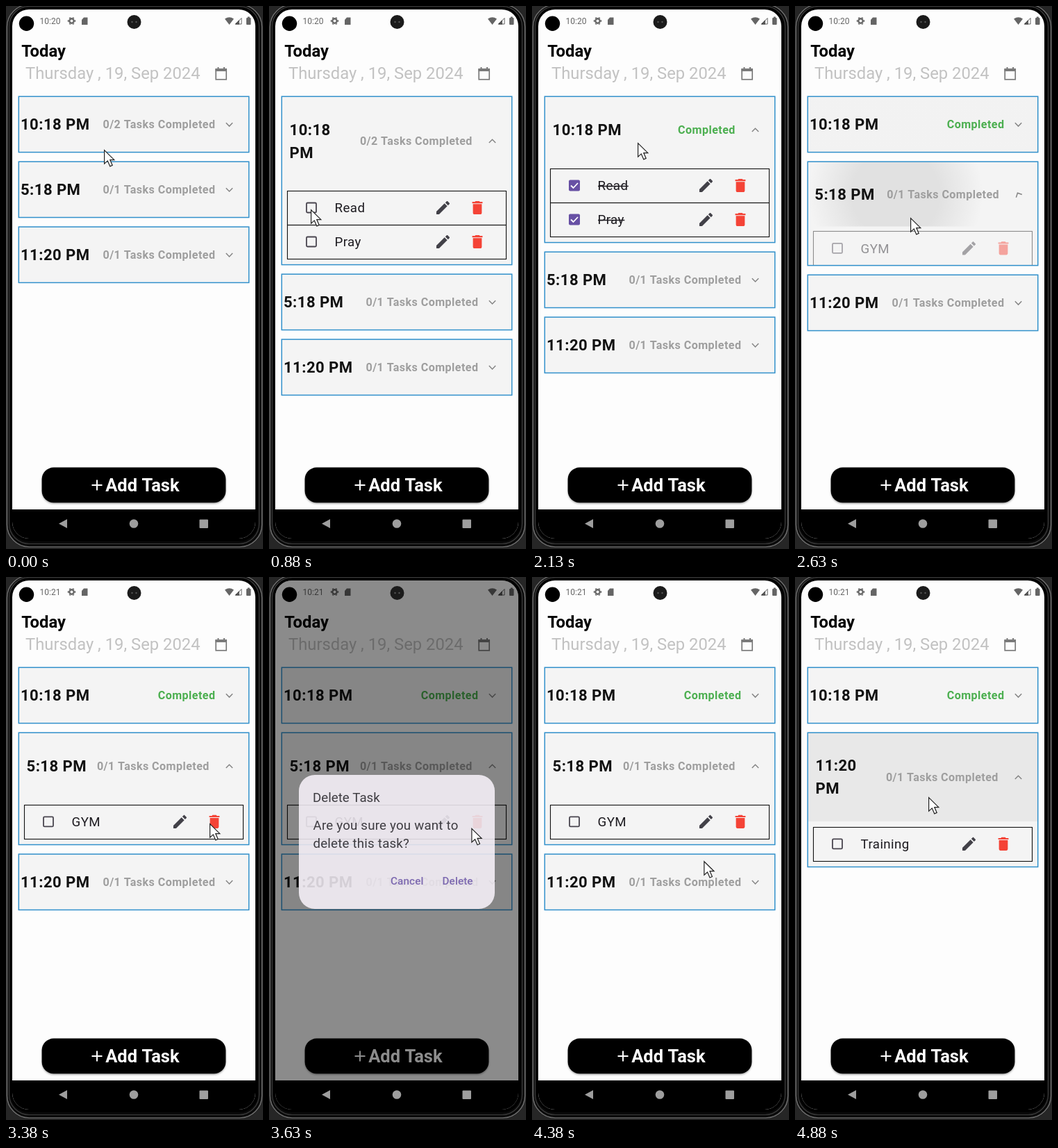
Animation of 370x782 px, one loop 5010 ms. Source, as an HTML page with a canvas:

```html
<!DOCTYPE html>
<html lang="en">
<head>
<meta charset="utf-8">
<title>Daily tasks</title>
<style>
html, body { margin: 0; width: 100%; height: 100%; overflow: hidden; background: #1c1c1c; }
canvas { display: block; width: 370px; height: 782px; }
</style>
</head>
<body>
<canvas id="stage"></canvas>
<script>
const W = 370, H = 782, LOOP = 5010, STEP = 125;
const canvas = document.getElementById('stage');
const ctx = canvas.getContext('2d');
const dpr = window.devicePixelRatio || 1;
canvas.width = W * dpr;
canvas.height = H * dpr;

const INK = '#1d1b20', GREY = '#9e9e9e', PURPLE = '#6750a4';
const ROW = 49, HEAD = 80, GAP = 13.9;
const pencil = new Path2D('M3 17.25V21h3.75L17.81 9.94l-3.75-3.75L3 17.25zM20.71 7.04c.39-.39.39-1.02 0-1.41l-2.34-2.34c-.39-.39-1.02-.39-1.41 0l-1.83 1.83 3.75 3.75 1.83-1.83z');
const bin = new Path2D('M6 19c0 1.1.9 2 2 2h8c1.1 0 2-.9 2-2V7H6v12zM19 4h-3.5l-1-1h-5l-1 1H5v2h14V4z');
const arrow = new Path2D('M0 0V19.5L4.7 15.3L8.2 23.3L11.6 21.8L8.2 14H14.2Z');

// Pointer path: time, x, y
const pointerKeys = [
  [0, 141, 207], [250, 141, 207], [750, 60, 293], [1125, 60, 293],
  [1375, 60, 342], [1625, 60, 342], [2000, 152, 197], [2200, 152, 197],
  [2450, 164, 290], [2625, 166, 305], [2875, 166, 305], [3375, 293, 355],
  [3550, 293, 355], [4000, 270, 447], [4250, 270, 447], [4600, 192, 317], [5010, 192, 317]
];

const clamp = v => Math.max(0, Math.min(1, v));
const ramp = (t, start, span) => clamp((t - start) / span);
const expand = (t, start) => ramp(t, start, 200) ** 1.5;

function pointerAt(t) {
  const i = Math.max(1, pointerKeys.findIndex(k => k[0] >= t));
  const [t0, x0, y0] = pointerKeys[i - 1], [t1, x1, y1] = pointerKeys[i];
  let u = (t - t0) / (t1 - t0);
  u = u * u * (3 - 2 * u);
  return [x0 + (x1 - x0) * u, y0 + (y1 - y0) * u];
}

// Text whose capitals are centred on y
function text(s, x, y, size, color, weight = 400, spacing = 0, align = 'left') {
  ctx.font = `${weight} ${size}px Roboto, sans-serif`;
  ctx.letterSpacing = spacing + 'px';
  ctx.textAlign = align;
  ctx.fillStyle = color;
  ctx.fillText(s, x, y + size * 0.355);
}

function rounded(x, y, w, h, r, fill) {
  ctx.beginPath();
  ctx.roundRect(x, y, w, h, r);
  if (fill) { ctx.fillStyle = fill; ctx.fill(); }
}

function ring(x, y, w, h, r, color, width) {
  rounded(x, y, w, h, r);
  ctx.strokeStyle = color;
  ctx.lineWidth = width;
  ctx.stroke();
}

function disc(x, y, r, fill) {
  ctx.beginPath();
  ctx.arc(x, y, r, 0, 7);
  ctx.fillStyle = fill;
  ctx.fill();
}

function line(points, color, width) {
  ctx.beginPath();
  points.forEach(([x, y]) => ctx.lineTo(x, y));
  ctx.strokeStyle = color;
  ctx.lineWidth = width;
  ctx.stroke();
}

function polygon(points, fill) {
  ctx.beginPath();
  points.forEach(([x, y]) => ctx.lineTo(x, y));
  ctx.fillStyle = fill;
  ctx.fill();
}

function outline(x, y, w, h, color, width) {
  ctx.strokeStyle = color;
  ctx.lineWidth = width;
  ctx.strokeRect(x, y, w, h);
}

function icon(path, x, y, fill) {
  ctx.save();
  ctx.translate(x, y);
  ctx.scale(1.06, 1.06);
  ctx.translate(-12, -12);
  ctx.fillStyle = fill;
  ctx.fill(path);
  ctx.restore();
}

function taskRow([name, done], y) {
  const cy = y + ROW / 2;
  outline(26.5, Math.round(y) + 0.5, 315, ROW, '#111', 1.1);
  if (done) {
    rounded(53, cy - 8, 16, 16, 2, PURPLE);
    line([[56, cy], [59.5, cy + 3.5], [66, cy - 3.5]], '#fff', 1.8);
  } else {
    ring(54, cy - 7, 14, 14, 1.5, '#49454f', 1.8);
  }
  text(name, 94.5, cy, 18.7, INK, 400, 0.43);
  if (done) line([[95, cy + 1], [95 + ctx.measureText(name).width, cy + 1]], INK, 1.4);
  icon(pencil, 250.5, cy, '#424148');
  icon(bin, 300, cy, '#f44336');
}

function splash(t, [start, x], cy) {
  const age = t - start;
  if (age <= 0 || age >= 500) return;
  const r = 125 * (age / 180) ** 3 + 1;
  const alpha = 0.12 * (1 - age / 500);
  const g = ctx.createRadialGradient(x, cy, r * 0.5, x, cy, r);
  g.addColorStop(0, `rgba(0,0,0,${alpha})`);
  g.addColorStop(1, 'rgba(0,0,0,0)');
  ctx.fillStyle = g;
  ctx.fillRect(18, cy - 90, 332, 180);
}

// Draws a card at y and returns its height
function card(c, y, t) {
  const p = c.open, pad = 8 * p, inset = 8.6 * p;
  const done = c.rows.filter(r => r[1]).length, all = done === c.rows.length;
  const wrap = c.time.length > 7 && !all && p > 0.05;
  const head = HEAD + (wrap ? 32 : 0);
  const height = head + pad * 4 + p * ROW * c.rows.length;
  const cy = y + pad + head / 2 + 0.2;

  ctx.save();
  ctx.beginPath();
  ctx.rect(18, y, 332, height);
  ctx.clip();
  ctx.fillStyle = '#f4f4f4';
  ctx.fillRect(18, y, 332, height);

  ctx.save();
  ctx.beginPath();
  ctx.rect(18, y, 332, head + pad * 2);
  ctx.clip();
  c.taps.forEach(tap => splash(t, tap, cy));
  ctx.restore();

  const lines = wrap ? c.time.split(' ') : [c.time];
  lines.forEach((s, i) => text(s, 21 + inset, cy + (i - (lines.length - 1) / 2) * 33, 22.1, '#111', 700, 0.43));
  text(all ? 'Completed' : `${done}/${c.rows.length} Tasks Completed`,
    301.4 - inset, cy, 16.1, all ? '#4caf50' : GREY, 700, 0.43, 'right');

  ctx.save();
  ctx.translate(321.5, cy + 0.5);
  ctx.rotate(Math.PI * p);
  line([[-4.7, -2.4], [0, 2.4], [4.7, -2.4]], '#858585', 1.5);
  ctx.restore();

  if (p > 0) {
    ctx.globalAlpha = p ** 5;
    c.rows.forEach((r, i) => taskRow(r, y + head + pad * 3 + i * ROW));
    ctx.globalAlpha = 1;
  }
  ctx.restore();
  outline(18.3, y + 0.3, 331.4, height + 0.3, '#3190cb', 1.5);
  return height;
}

function cardsAt(t) {
  const cards = [
    { time: '10:18 PM', open: expand(t, 110) * (1 - expand(t, 2150)),
      taps: [[110, 141], [2150, 152]], rows: [['Read', t >= 1000], ['Pray', t >= 1500]] },
    { time: '5:18 PM', open: expand(t, 2445), taps: [[2445, 145]], rows: [['GYM', false]] },
    { time: '11:20 PM', open: expand(t, 4595), taps: [[4595, 192]], rows: [['Training', false]] }
  ];
  return cards.filter((c, i) => i !== 1 || t < 4450);
}

function page(t) {
  ctx.fillStyle = '#fdfdfd';
  ctx.fillRect(9, 5, 350, 762);
  text('Today', 22.2, 65, 23.8, '#000', 700);
  text('Thursday , 19, Sep 2024', 28, 97, 23.8, '#c2c2c2');

  outline(302.2, 91.2, 15, 14.6, '#7a7a7a', 1.7);
  ctx.fillStyle = '#7a7a7a';
  ctx.fillRect(301.4, 90, 16.6, 4);
  ctx.fillRect(304.5, 88, 2, 3);
  ctx.fillRect(313, 88, 2, 3);

  let y = 130;
  for (const c of cardsAt(t)) y += card(c, y, t) + GAP;

  ctx.save();
  ctx.shadowColor = 'rgba(0,0,0,.35)';
  ctx.shadowBlur = 2.5 * dpr;
  ctx.shadowOffsetY = 1.5 * dpr;
  rounded(51.6, 664.6, 264.8, 50.6, 17, '#000');
  ctx.restore();
  line([[123.5, 690], [138.5, 690]], '#fff', 2);
  line([[131, 682.5], [131, 697.5]], '#fff', 2);
  text('Add Task', 143.2, 690, 25.5, '#fff', 700);
}

function dialog(alpha) {
  if (!alpha) return;
  ctx.globalAlpha = alpha;
  ctx.fillStyle = 'rgba(0,0,0,.54)';
  ctx.fillRect(9, 5, 350, 762);
  rounded(43, 285, 282, 193, 23, '#fdf7ff');
  text('Delete Task', 63, 317.6, 18.7, INK);
  text('Are you sure you want to', 63.5, 357, 18.7, INK, 400, 0.21);
  text('delete this task?', 63.5, 383.5, 18.7, INK, 400, 0.21);
  text('Cancel', 175, 437.5, 15.3, PURPLE, 500, 0.09);
  text('Delete', 249.5, 437.5, 15.3, PURPLE, 500, 0.09);
  ctx.globalAlpha = 1;
}

function systemBars(t) {
  const tone = 'rgba(0,0,0,.6)';
  text(t < 2900 ? '10:20' : '10:21', 48.5, 22, 12, tone);

  // gear
  ctx.strokeStyle = tone;
  ctx.lineWidth = 2.4;
  ctx.beginPath();
  ctx.arc(94.5, 21.5, 3.2, 0, 7);
  ctx.stroke();
  for (let i = 0; i < 6; i++) {
    const c = Math.cos(i * Math.PI / 3), s = Math.sin(i * Math.PI / 3);
    line([[94.5 + 4.4 * c, 21.5 + 4.4 * s], [94.5 + 5.7 * c, 21.5 + 5.7 * s]], tone, 2.4);
  }
  polygon([[109, 20], [112, 16.5], [117.5, 16.5], [117.5, 27], [109, 27]], tone);

  // wifi, signal, battery
  ctx.beginPath();
  ctx.moveTo(321.5, 27);
  ctx.lineTo(315, 18.5);
  ctx.quadraticCurveTo(321.5, 14, 328, 18.5);
  ctx.fillStyle = tone;
  ctx.fill();
  polygon([[329.5, 26.5], [336, 20], [336, 26.5]], tone);
  line([[330.5, 26], [339, 17.5], [339, 26], [330.5, 26]], tone, 1);
  rounded(346, 17, 6.5, 10, 1, tone);
  rounded(347.8, 15.6, 3, 1.4, 0, tone);

  ctx.fillStyle = '#000';
  ctx.fillRect(9, 725, 350, 42);
  polygon([[76, 745.5], [88, 739], [88, 752]], GREY);
  disc(184, 745.5, 6.3, GREY);
  rounded(278.5, 739.5, 12.5, 12.5, 1, GREY);
}

function draw(t) {
  ctx.setTransform(dpr, 0, 0, dpr, 0, 0);
  ctx.fillStyle = '#262626';
  ctx.fillRect(0, 0, W, H);

  // phone body
  rounded(1, -3, 368, 783, 32, '#0a0a0a');
  ring(1.5, -2, 367, 781, 32, '#6a6a6a', 1.6);
  ring(4.5, 0.5, 360, 774, 29, '#3c3c3c', 1.2);
  rounded(6, 2, 357, 769, 27, '#000');

  ctx.save();
  rounded(9, 5, 350, 762, 24);
  ctx.clip();
  page(t);
  dialog(ramp(t, 3500, 150) * (1 - ramp(t, 4255, 110)));
  systemBars(t);
  ctx.restore();

  disc(29.5, 25.3, 10.7, '#000');
  disc(184.5, 23, 10, '#1b1b1b');
  disc(181.5, 23, 1.2, '#555');
  disc(187.5, 23, 1.2, '#555');

  const [px, py] = pointerAt(t);
  ctx.save();
  ctx.translate(px + 0.6, py + 0.6);
  ctx.fillStyle = '#fff';
  ctx.fill(arrow);
  ctx.strokeStyle = '#222';
  ctx.lineWidth = 1.2;
  ctx.stroke(arrow);
  ctx.restore();
}

function tick() {
  const step = Math.min(39, Math.floor(performance.now() % LOOP / STEP));
  draw(step * STEP);
  requestAnimationFrame(tick);
}
tick();
</script>
</body>
</html>
```
